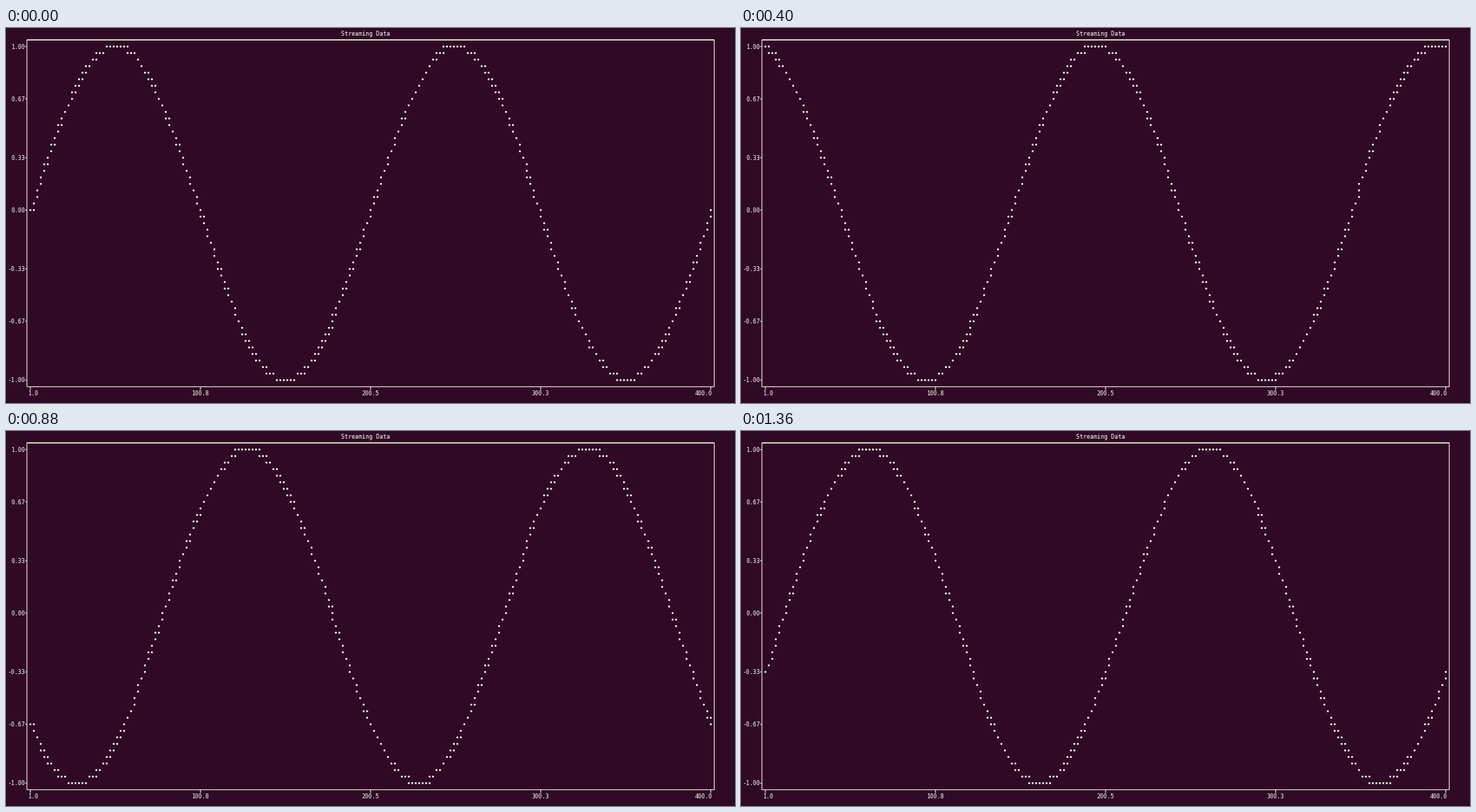
A matplotlib script that plays this animation: 1042x537 px, repeating every 1.44 s.

```python
import numpy as np
import matplotlib.pyplot as plt
from matplotlib.animation import FuncAnimation

W, H, DPI = 1042, 537, 100
FRAMES, INTERVAL = 18, 80
BG, FG, LINE = "#300a24", "#ffffff", "#d8d6cc"

# Character grid: each dot sits in the centre of one terminal cell
COLS, ROWS, POINTS = 197, 52, 400
CELL_W, CELL_H = 4.962, 9.368
LEFT, BOTTOM = 34.85, 504.3
PT = 72 / DPI


def col_x(col):
    return LEFT + CELL_W * col


def row_y(row):
    return BOTTOM - CELL_H * row


def to_cell(t, count):
    """Map 0..1 to a cell index; values are rounded to one decimal, then half up."""
    return np.floor(np.asarray(t) * (count - 1) + 0.55)


def wave(frame):
    i = np.arange(POINTS)
    phase = 2 * np.pi * frame / FRAMES
    y = np.sin(4 * np.pi * i / (POINTS - 1) + phase)
    cols = to_cell(i / (POINTS - 1), COLS)
    rows = to_cell((y + 1) / 2, ROWS)
    cells = np.unique(np.column_stack([cols, rows]), axis=0)
    return np.column_stack([col_x(cells[:, 0]), row_y(cells[:, 1])])


fig = plt.figure(figsize=(W / DPI, H / DPI), dpi=DPI, facecolor=BG)
ax = fig.add_axes([0, 0, 1, 1])
ax.set_xlim(0, W)
ax.set_ylim(H, 0)
ax.axis("off")


def line(xs, ys):
    ax.plot(xs, ys, color=LINE, lw=1.25 * PT, snap=False,
            solid_capstyle="butt", solid_joinstyle="miter")


def label(x, y, text, align):
    ax.text(x, y + 3.1, text, color=FG, ha=align, va="baseline",
            family="DejaVu Sans Mono", size=8.24 * PT)


x0, x1 = col_x(-1), col_x(COLS)
y0, y1 = row_y(ROWS), row_y(-1)
line([x0, x1, x1, x0, x0, x1], [y0, y0, y1, y1, y0, y0])
label(514, y0 - CELL_H, "Streaming Data", "center")

for value in np.linspace(-1, 1, 7):
    y = row_y(to_cell((value + 1) / 2, ROWS))
    line([x0 - CELL_W / 2, x0], [y, y])
    label(x0 - CELL_W / 2 + 0.3, y, f"{value + 0.0:.2f}", "right")

for k, text in enumerate(["1.0", "100.8", "200.5", "300.3", "400.0"]):
    x = col_x(49 * k)
    line([x, x], [y1, y1 + CELL_H / 2])
    if k == 0:
        label(x - CELL_W / 2, y1 + CELL_H, text, "left")
    elif k == 4:
        label(x + CELL_W / 2, y1 + CELL_H, text, "right")
    else:
        label(x, y1 + CELL_H, text, "center")

dots = ax.scatter([], [], s=(2.8 * PT) ** 2, c=FG, linewidths=0, edgecolors="none")


def update(frame):
    dots.set_offsets(wave(frame))
    return [dots]


anim = FuncAnimation(fig, update, frames=FRAMES, interval=INTERVAL,
                     init_func=lambda: update(0), repeat=True, repeat_delay=0)
plt.show()
```
